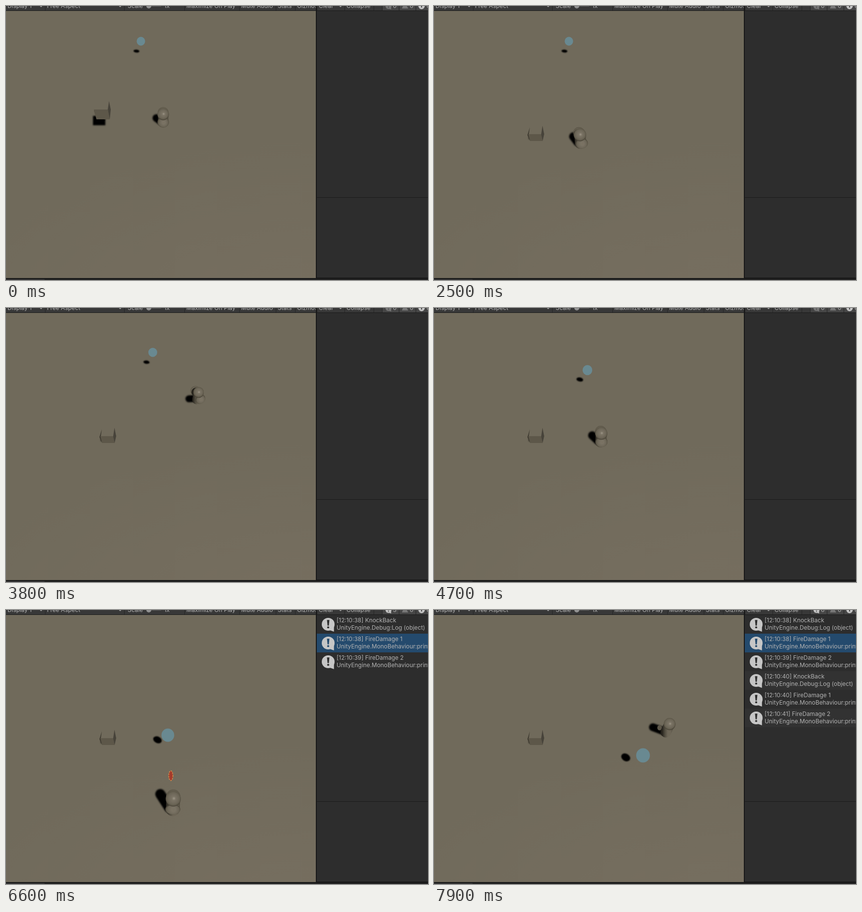
These frames come from a looping animation (854 by 556 pixels, 8000 ms). An HTML page with a canvas:

```html
<!DOCTYPE html>
<html lang="en">
<head>
<meta charset="utf-8">
<title>Game view and console</title>
<style>
html, body { margin: 0; width: 100%; height: 100%; overflow: hidden; background: #191919; }
canvas { display: block; }
</style>
</head>
<body>
<canvas id="stage" width="854" height="556"></canvas>
<script>
const g = document.getElementById('stage').getContext('2d');
const LOOP = 8000, FLOOR = '#706a5b';
const clamp = (v, a, b) => Math.min(b, Math.max(a, v));
const mix = (a, b, u) => a + (b - a) * u;

// Waypoints: time, x, y (and facing in degrees for the player)
const PLAYER = [
  [1600, 318, 227, 90], [2250, 292, 274, 85], [2500, 296, 269.5, 80], [3800, 388, 178, 50],
  [4900, 333, 271, 88], [5600, 333, 271, 88], [6600, 338, 393, 90], [6700, 343, 429, 82],
  [7100, 474, 414, 45], [7900, 473, 239, -70]];
const BALL = [
  [3200, 273, 71.5], [3800, 297, 90], [4900, 313.5, 134], [5600, 319, 170],
  [6600, 327.5, 254], [7100, 325, 263], [7900, 423, 295]];
const HITS = [5600, 6700];

// Every hit logs a knockback and two fire ticks one second apart
const LOG = HITS.flatMap(t => [[t, 'KnockBack'], [t, 'FireDamage 1'], [t + 1000, 'FireDamage 2']])
  .sort((a, b) => a[0] - b[0]);

function sample(path, t, power = 1) {
  let i = 1;
  while (i < path.length - 1 && path[i][0] < t) i++;
  const a = path[i - 1], b = path[i];
  const u = 1 - (1 - clamp((t - a[0]) / (b[0] - a[0]), 0, 1)) ** power;
  return a.slice(1).map((v, k) => mix(v, b[k + 1], u));
}
const playerAt = t => sample(PLAYER, t, 1.4);
const ballAt = t => sample(BALL, t);

function rect(x, y, w, h, color) {
  g.fillStyle = color;
  g.fillRect(x, y, w, h);
}
function oval(x, y, rx, ry, color, turn = 0) {
  g.beginPath();
  g.ellipse(x, y, rx, ry, turn, 0, 7);
  g.fillStyle = color;
  g.fill();
}
function poly(color, ...points) {
  g.beginPath();
  points.forEach(p => g.lineTo(...p));
  g.closePath();
  g.fillStyle = color;
  g.fill();
}
function capsule(p, q, width, color) {
  g.beginPath();
  g.moveTo(...p);
  g.lineTo(...q);
  g.lineCap = 'round';
  g.lineWidth = width;
  g.strokeStyle = color;
  g.stroke();
}
function text(s, x, y, color = '#b2b2b2') {
  g.fillStyle = color;
  g.fillText(s, x, y);
}
function blurred(px, draw) {
  g.filter = `blur(${px}px)`;
  draw();
  g.filter = 'none';
}
function ramp(gradient, ...colors) {
  colors.forEach((c, i) => gradient.addColorStop(i / (colors.length - 1), c));
  return gradient;
}

function floor() {
  g.save();
  g.beginPath();
  g.rect(0, 10, 627, 542);
  g.clip();
  rect(0, 10, 627, 542, FLOOR);
  g.translate(610, 640);
  g.scale(1, .52);
  oval(0, 0, 720, 720, ramp(g.createRadialGradient(0, 0, 0, 0, 0, 720), '#776f60', FLOOR));
  g.restore();
}

function crate(t) {
  const u = clamp((t - 1400) / 600, 0, 1) ** 2;
  const x = mix(178, 191, u), y = mix(210, 260, u), w = 28 - 2 * u, h = 20 - 6 * u;
  const right = x + w, tilt = h * .25, peak = [right + 2.5, y - 17], near = [right + tilt * .8, y + h];
  blurred(1.6, () => rect(x - 2 + 3 * u, y + 13 - 12 * u, 25, 19 - 10 * u, '#000'));
  poly(FLOOR, [x, y], [x + 3, y - 15], peak, [right, y]);
  poly('#403c32', [x - 2 * u, y + 2], [x + 3 * u, y - 14 * u], [x + u, y], [x + tilt, y + h]);
  poly('#5d5749', [x, y], [right, y], near, [x + tilt, y + h]);
  poly('#47433a', [right, y], peak, [right + 6, y], near);
}

function ball(t) {
  const [x, y] = ballAt(t), depth = y - 72, r = 8.9 + depth * .025;
  const sx = x - 9 - (x - 273) * .136 - depth * .025, sy = y + 20 - depth ** 2 * .00032;
  blurred(1, () => oval(sx, sy, r * .67, r * .34 + depth * .011, '#000', .1 + depth * .002));
  oval(x, y, r * .96, r, '#698991');
}

function ball3d(x, y, r, ry = r, turn = 0, lit = '#a0988a') {
  const shade = ramp(g.createRadialGradient(x + r * .1, y, 0, x, y, r * 1.05),
    lit, '#7a7364', '#736c5e', '#6b6556', '#575143');
  oval(x, y, r, ry, shade, turn);
}

function player(t) {
  const [x, y, deg] = playerAt(t), a = deg * Math.PI / 180, cos = Math.cos(a), sin = Math.sin(a);
  const r = 11.5 + (y - 227) * .022, lean = (x - 318) * .025;
  const base = [x - lean, y + r * .75], head = [x + lean, y - r * .7];
  const tip = [x - 14 - (x - 318) * .1 - (y - 230) * .06, y - (y - 230) * .12];
  const disc = () => {
    const flat = clamp(.95 - (y - 230) * .0018, .6, .95) * (1 - .2 * Math.abs(cos));
    const fx = base[0] + cos * r * 1.1, fy = base[1] + (sin - 1) * r * .35;
    oval(fx, fy, r, r * flat, '#4c473b', a - Math.PI / 2);
    ball3d(fx + .5, fy + .8, r * .95, r * flat * .95, a - Math.PI / 2, '#797162');
  };

  blurred(1.8, () => capsule([base[0] - r * .5, base[1] - r * .2], tip, r * 1.35, '#000'));
  if (sin < 0) {
    oval(x - r * 1.4, y, r * .4, r * .45, '#5b5548');
  } else {
    ball3d(head[0] - r * cos, head[1] - r * .25, r * .95, r * .95, 0, '#6b6556');
    oval(head[0] - r * cos * .7, head[1], r * .95, r * .9, '#28251e');
  }
  capsule(base, head, r * 1.85,
    ramp(g.createLinearGradient(x - r, 0, x + r, 0), '#24211b', '#4f4a3e', '#6d6657', '#6d6657', '#4f4a3d'));
  if (sin >= 0) disc();
  oval(head[0], head[1] + 1.2, r, r, '#4a4539');
  ball3d(...head, r);
}

function bullet(hit, t) {
  const u = (t - hit) / 270 + 1;
  if (u < 0 || u >= 1) return;
  const from = ballAt(hit - 270), to = playerAt(hit - 100);
  const x = mix(from[0], to[0], u), y = mix(from[1], to[1], u);
  oval(x, y, 4.2, 10, '#a53b2b');
  g.setLineDash([2, 3]);
  g.lineWidth = 1.6;
  g.strokeStyle = '#cf8a4c';
  g.stroke();
  g.setLineDash([]);
}

function bubble(x, y, r, color, mark) {
  oval(x, y, r, r, color);
  poly(color, [x + r * .2, y + r * .9], [x + r * .9, y + r * 1.15], [x + r * .9, y + r * .2]);
  poly(mark, [x - r * .19, y - r * .68], [x + r * .19, y - r * .68], [x + r * .1, y + r * .22], [x - r * .1, y + r * .22]);
  oval(x, y + r * .48, r * .16, r * .16, mark);
}

function toolbar(count) {
  const cells = { 'Display 1': -1, 'Free Aspect': 79, ' Scale': 239, 'Maximize On Play': 361, 'Mute Audio': 472,
    'Stats': 546, 'Gizmos': 585, 'Clear': 629, 'Collapse': 685 };
  rect(0, 0, 854, 9, '#383838');
  for (const [label, x] of Object.entries(cells)) {
    rect(x, 0, 854 - x, 9, '#383838');
    rect(x, 0, 1, 9, '#262626');
    text(label, x + 4, 4);
  }
  text('1x', 320, 4);
  for (const x of [71, 231, 677]) poly('#a0a0a0', [x - 2.5, 0], [x + 2.5, 0], [x, 2.5]);
  rect(289, 0, 25, 1, '#5c5c5c');
  oval(289, 0, 5, 5, '#929292');

  rect(744, 0, 1, 9, '#262626');
  [count, 0, 0].forEach((n, i) => {
    const x = 761 + i * 34;
    rect(x, 0, 93, 9, '#464646');
    rect(x, 0, 1, 9, '#262626');
    text(n, x + 22, 4);
  });
  bubble(774, 0, 6, count ? '#c4c4c4' : '#777', '#464646');
  poly('#777', [801, 5], [807, -7], [814, 5]);
  oval(841, 0, 6.5, 6.5, '#c4c4c4');
  rect(840, -3, 2, 6, '#464646');
  rect(0, 9, 854, 1, '#1b1b1b');
}

function consolePanel(rows) {
  rect(629, 10, 225, 541, '#2d2d2d');
  rows.forEach(([time, label], i) => {
    const y = 10 + i * 38, back = i === 1 ? '#244a6d' : i % 2 ? '#323232' : '#2d2d2d';
    const second = 40 + Math.floor((time - 6650) / 1000);
    rect(629, y, 225, 38, back);
    bubble(652, y + 19, 13, '#c6c6c6', back);
    text(`[12:10:${second}] ${label}`, 669, y + 15);
    text(label === 'KnockBack' ? 'UnityEngine.Debug:Log (object)' : 'UnityEngine.MonoBehaviour:print (object)', 669, y + 30);
  });
  rect(629, 388, 225, 1, '#1b1b1b');
}

function draw(t) {
  rect(0, 0, 854, 556, '#191919');
  floor();
  crate(t);
  ball(t);
  player(t);
  HITS.forEach(hit => bullet(hit, t));
  const rows = LOG.filter(([time]) => time <= t);
  consolePanel(rows);
  toolbar(rows.length);
  rect(627, 0, 2, 556, '#191919');
  rect(0, 554, 854, 2, '#242424');
  rect(0, 554, 78, 2, '#353535');
}

function tick(now) {
  g.font = '11.85px Inter, sans-serif';
  draw(Math.floor(now % LOOP / 100) * 100);
  requestAnimationFrame(tick);
}
requestAnimationFrame(tick);
</script>
</body>
</html>
```
